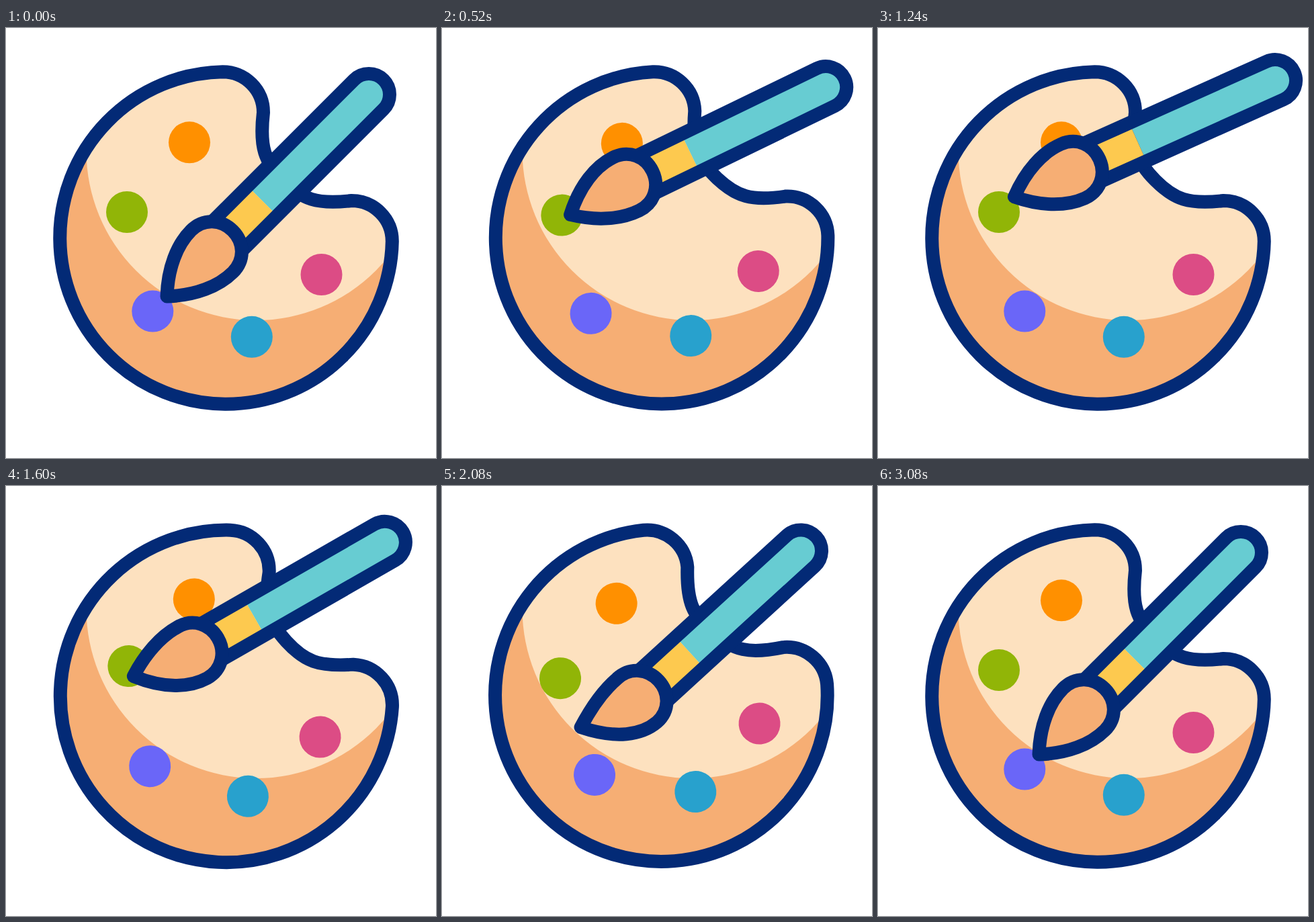
An HTML page for the animation above (3280 ms loop, 640 by 640 pixels).

```html
<!DOCTYPE html>
<html lang="en">
<head>
<meta charset="utf-8">
<title>Palette and brush</title>
<style>
  html, body { margin: 0; width: 100%; height: 100%; overflow: hidden; background: #fff; }
  svg { display: block; width: 100vw; height: 100vh; }
  .line { fill: none; stroke: #032a76; stroke-width: 20; stroke-linejoin: round; }
</style>
</head>
<body>
<svg viewBox="0 0 640 640">
  <defs>
    <path id="board" d="M322.5 65.2 A60.5 60.5 0 0 1 383 125.7
      C377 178 385 199 413 227 S462 263 514.3 257
      A60.5 60.5 0 0 1 574.8 317.5 A247.3 247.3 0 1 1 322.5 65.2 Z"/>
    <clipPath id="inside"><use href="#board" class="turn"/></clipPath>
  </defs>

  <use href="#board" class="turn" fill="#f6ae74"/>
  <g clip-path="url(#inside)"><circle cx="372" cy="182.5" r="252.5" fill="#fde1bf"/></g>
  <g class="turn">
    <use href="#board" class="line"/>
    <circle cx="273" cy="170.3" r="31" fill="#ff9000"/>
    <circle cx="180" cy="274" r="31" fill="#91b507"/>
    <circle id="dip" cx="218.3" cy="421.6" r="31" fill="#6a66f8"/>
    <circle cx="365.8" cy="459.8" r="31" fill="#28a1cd"/>
    <circle cx="469.5" cy="367" r="31" fill="#dc4c85"/>
  </g>

  <!-- The origin is the seam between handle and ferrule -->
  <g id="brush">
    <path d="M0 -31 H224 A31 31 0 0 1 224 31 H0 Z" fill="#67ccd2"/>
    <path d="M-70 -31 H0 V31 H-70 Z" fill="#fdc94f"/>
    <path d="M-72 -31 H224 A31 31 0 0 1 224 31 H-72" class="line"/>
    <path id="hair" class="line" style="fill:#f6ae74"/>
  </g>
</svg>
<script>
const LOOP = 3280, STEP = 40, HANDLE = 224;
const ROOT = 62.5, TIP = 201;

const board = document.querySelectorAll('.turn');
const [dip, brush, hair] = ['dip', 'brush', 'hair'].map(id => document.getElementById(id));

const part = (t, from, to) => Math.min(1, Math.max(0, (t - from) / (to - from)));
// 0 to 1, and 0 to 1 and back to 0
const ease = (t, from, to) => (1 - Math.cos(Math.PI * part(t, from, to))) / 2;
const bump = (t, from, to) => Math.sin(Math.PI * part(t, from, to)) ** 2;

// One rock of the board: forward, back, to rest
const rock = t => 5 * (ease(t, 0, 320) - 2 * ease(t, 320, 640) + ease(t, 640, 960));

// Egg with a pointed end; the bend grows towards the tip
function hairPath(bend) {
  const point = (u, v) => {
    const s = ((u - ROOT) / (TIP - ROOT)) ** 5;
    return `${s * bend * bend / 120 - u} ${v + bend * s}`;
  };
  const side = k => [point(ROOT, 24 * k), point(80, 44 * k), point(106, 44 * k),
    point(136, 44 * k), point(170, 29 * k)];
  return `M${point(ROOT, 0)} C${side(-1).join(' ')} ${point(TIP, 0)}
    ${side(1).reverse().join(' ')} ${point(ROOT, 0)} Z`;
}

function draw(t) {
  const turn = `rotate(${rock(t) + rock(t - 1440)} 317.5 325.5)`;
  board.forEach(el => el.setAttribute('transform', turn));

  const grow = bump(t, 2760, 3080);
  dip.setAttribute('r', 31 + 10 * grow);
  dip.setAttribute('cx', 218.3 - 3 * grow);

  // Handle end: lifted on the way out, overshooting sideways on the way back
  const raise = ease(t, 0, 640) - ease(t, 1200, 2340);
  const reach = ease(t, 280, 700) - ease(t, 1350, 1830);
  const x = 540 + 51 * reach - 6 * bump(t, 1830, 2330);
  const y = 99 - 21 * raise + 18.5 * bump(t, 0, 680);
  const angle = 45 - 20.9 * raise;
  brush.setAttribute('transform', `translate(${x} ${y}) rotate(${-angle}) translate(${-HANDLE} 0)`);

  // The hair drags behind the stroke
  const drag = ease(t, 1140, 2080) - ease(t, 2080, 2480);
  hair.setAttribute('d', hairPath(16 * bump(t, 0, 640) - 27 * drag));
}

const start = performance.now();
function tick() {
  const t = (performance.now() - start) % LOOP;
  draw(Math.floor(t / STEP) * STEP);
  requestAnimationFrame(tick);
}
tick();
</script>
</body>
</html>
```
